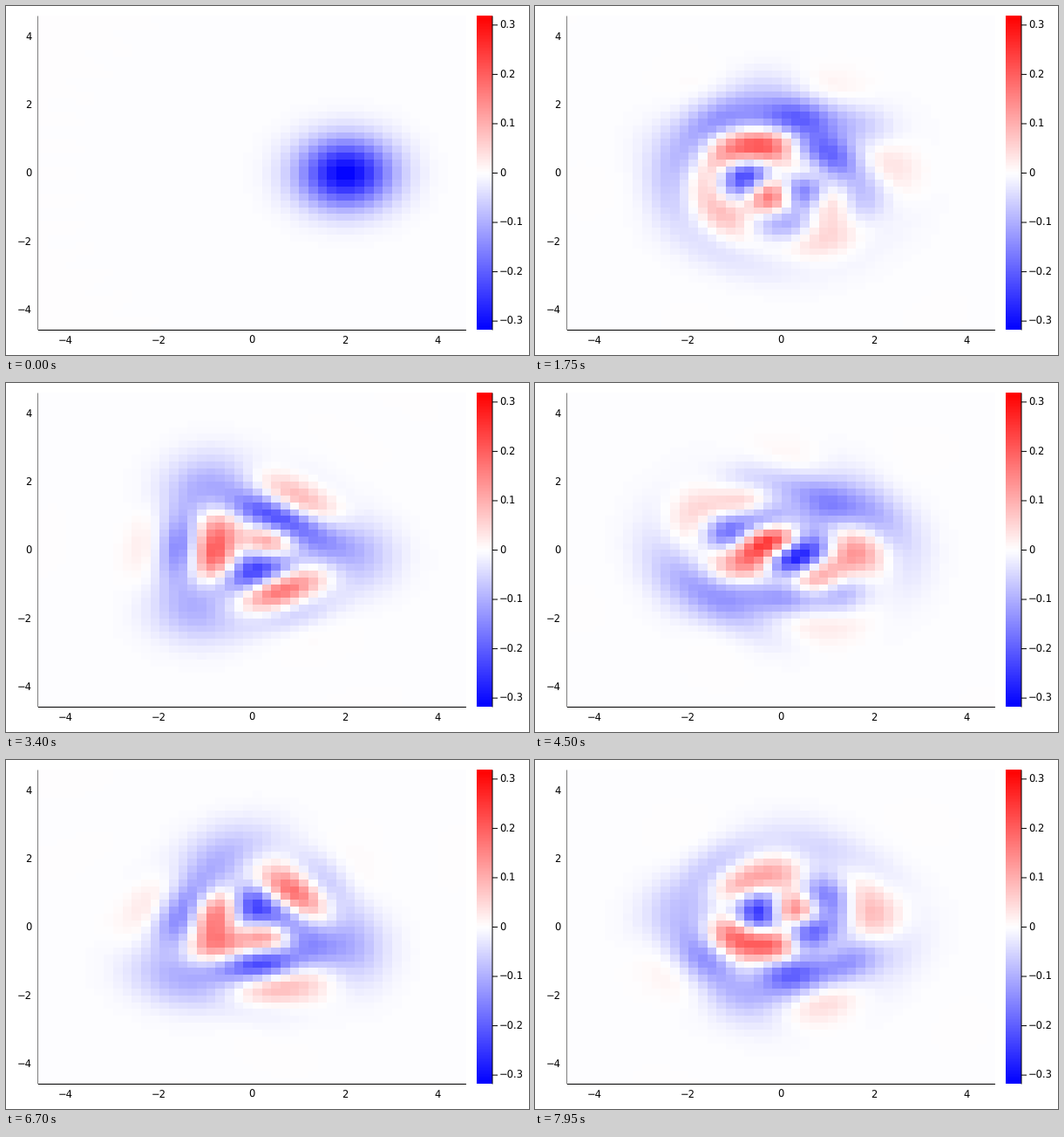
Write a matplotlib script that moves like this. It is 600x400 px and loops after 8 s.

```python
import math

import numpy as np
import matplotlib.pyplot as plt
from matplotlib.animation import FuncAnimation
from matplotlib.colors import LinearSegmentedColormap

# Wigner function of a coherent state evolving in a Kerr medium
WIDTH, HEIGHT, DPI = 600, 400, 100
INTERVAL, FRAMES = 50, 160
REVIVAL = 10300.0          # ms until the state would revive
LEVELS = 32
ALPHA = math.sqrt(2)
PEAK = 1 / math.pi

LEFT, RIGHT, TOP, BOTTOM = 37, 528, 11.48, 371.48
CELL_SHIFT = 0.45          # makes column edges round up to whole pixels
BAR_LEFT, BAR_RIGHT = 540, 558
SPAN = 4.6

# Lattice fine enough to hold every x + y and x - y
STEP = 0.1
lattice = np.linspace(-10.5, 10.5, 211)
shift = np.arange(-60, 61)
cells = np.linspace(-4.5, 4.5, 46)
rows = 60 + 2 * np.arange(46)[:, None]
kernel = np.exp(2j * STEP * np.outer(shift, cells))


def oscillator_states(x, count):
    states = [math.pi ** -0.25 * np.exp(-x ** 2 / 2)]
    states.append(math.sqrt(2) * x * states[0])
    for n in range(2, count):
        states.append(math.sqrt(2 / n) * x * states[-1]
                      - math.sqrt((n - 1) / n) * states[-2])
    return np.array(states)


n = np.arange(LEVELS)
basis = oscillator_states(lattice, LEVELS)
start = np.array([math.exp(-ALPHA ** 2 / 2) * ALPHA ** k
                  / math.sqrt(math.factorial(k)) for k in range(LEVELS)])


def wigner(t):
    psi = (start * np.exp(1j * math.pi * n * (n - 1) * t / REVIVAL)) @ basis
    product = psi[rows + shift].conj() * psi[rows - shift]
    return (product @ kernel).real.T * STEP / math.pi


plt.rcParams["text.hinting"] = "none"
fig = plt.figure(figsize=(WIDTH / DPI, HEIGHT / DPI), dpi=DPI, facecolor="white")
ax = fig.add_axes([0, 0, 1, 1])
ax.axis("off")

cmap = LinearSegmentedColormap.from_list(
    "blue_red", ["blue", (0.998, 0.998, 1), "red"])
style = dict(cmap=cmap, vmin=-PEAK, vmax=PEAK, zorder=2)
heat = ax.pcolormesh(np.linspace(LEFT, RIGHT, 47) + CELL_SHIFT,
                     np.linspace(BOTTOM, TOP, 47), -wigner(0), **style)
ax.pcolormesh([BAR_LEFT, BAR_RIGHT], np.linspace(BOTTOM, TOP, 257),
              np.linspace(-PEAK, PEAK, 256)[:, None], **style)
ax.set_xlim(0, WIDTH)
ax.set_ylim(HEIGHT, 0)


def line(x0, y0, x1, y1, zorder=3):
    ax.plot([x0, x1], [y0, y1], color="black", lw=0.72, zorder=zorder,
            solid_capstyle="butt", snap=False)


def label(x, y, text, align):
    ax.text(x, y + 4.2, text.replace("-", "\u2212"), ha=align, va="baseline",
            family="DejaVu Sans", size=8.3, color="black")


line(LEFT, TOP, LEFT, BOTTOM, zorder=1)
line(LEFT, BOTTOM, RIGHT, BOTTOM)
line(BAR_RIGHT, TOP, BAR_RIGHT, BOTTOM)

mid_x, mid_y = (LEFT + RIGHT) / 2, (TOP + BOTTOM) / 2
half_w, half_h = (RIGHT - LEFT) / 2, (BOTTOM - TOP) / 2
for v in range(-4, 5, 2):
    label(mid_x - 0.4 + v / SPAN * half_w, 382.8, str(v), "center")
    label(29.5, mid_y - v / SPAN * half_h, str(v), "right")
for k in range(-3, 4):
    y = mid_y - k / 10 / PEAK * half_h
    line(BAR_RIGHT, y, BAR_RIGHT + 6, y)
    label(566, y, f"{k / 10:.1f}" if k else "0", "left")


def update(frame):
    heat.set_array(-wigner(frame * INTERVAL))
    return [heat]


anim = FuncAnimation(fig, update, frames=FRAMES, interval=INTERVAL,
                     repeat=True, repeat_delay=0, blit=False)
plt.show()
```
